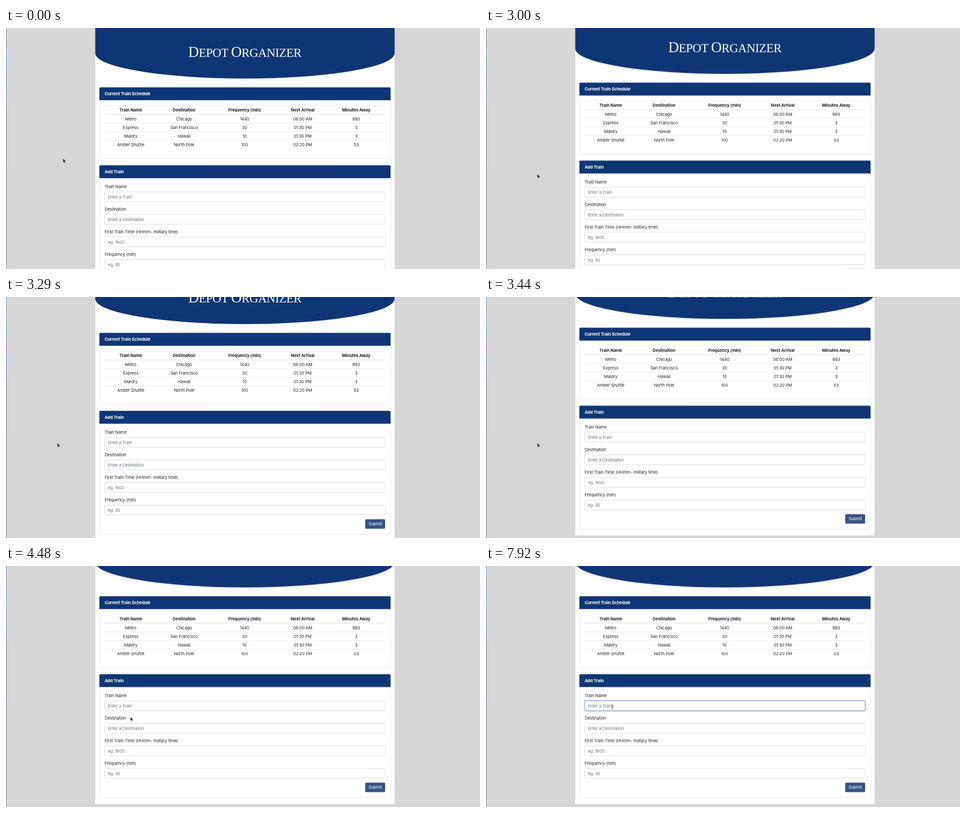
Recreate the animation shown at these times as an HTML page. Size 1049x534 px, loop 8 s.

```html
<!DOCTYPE html>
<html lang="en">
<head>
<meta charset="utf-8">
<title>Depot Organizer</title>
<style>
html, body { margin: 0; width: 100%; height: 100%; overflow: hidden; background: #d6d6d6; }
svg { display: block; width: 1049px; height: 534px; }
text { font: 9.3px Inter, "Open Sans", sans-serif; letter-spacing: -.016em; fill: #212529; }
.mid { text-anchor: middle; }
.bold { font-weight: 700; }
.light { fill: #fff; }
.hint { fill: #6c757d; }
.title { font: 27px "Liberation Serif", serif; letter-spacing: -.5px; fill: #fff; }
.title tspan { font-size: 33px; }
.navy { fill: #0f3674; }
.card { fill: #fff; stroke: #dfdfdf; stroke-width: .8; }
.field { fill: #fff; stroke: #ced4da; stroke-width: .9; }
.rule { stroke: #dee2e6; stroke-width: .8; }

#page, #cursor, #arrow, #beam, #focus, #caret { animation: 8s step-end infinite; }
#page { animation-name: scroll; }
#cursor { animation-name: move; }
#arrow { animation-name: arrow; }
#beam { animation-name: beam; }
#focus { animation-name: focus; }
#caret { animation-name: blink; }

@keyframes scroll {
  0% { transform: translateY(0); }
  37.5% { transform: translateY(-10.4px); }
  39.375% { transform: translateY(-28.5px); }
  41.125% { transform: translateY(-52px); }
  43% { transform: translateY(-63.4px); }
  44.875%, 100% { transform: translateY(-64.5px); }
}
@keyframes move {
  0% { transform: translate(126.4px, 289.5px); }
  1.875% { transform: translate(127.5px, 296px); }
  3.75% { transform: translate(127px, 312px); }
  5.625% { transform: translate(123px, 327px); }
  7.5% { transform: translate(117px, 331.5px); }
  9.375% { transform: translate(113.2px, 324.2px); }
  13.125% { transform: translate(113.6px, 323.6px); }
  50.5% { transform: translate(124px, 329px); }
  52.25% { transform: translate(175px, 347px); }
  54.125% { transform: translate(243px, 348px); }
  56% { transform: translate(275.4px, 334.4px); }
  57.75% { transform: translate(279px, 322px); }
  59.625% { transform: translate(280px, 315px); }
  61.5% { transform: translate(280px, 313px); }
  63.375%, 100% { transform: translate(279.8px, 312.2px); }
}
@keyframes arrow { 0% { opacity: 1; } 59.625%, 100% { opacity: 0; } }
@keyframes beam { 0% { opacity: 0; } 59.625%, 100% { opacity: 1; } }
@keyframes focus { 0% { opacity: 0; } 67.125% { opacity: .6; } 69%, 100% { opacity: 1; } }
@keyframes blink {
  0% { opacity: 0; }
  67.125% { opacity: 1; }
  72.75% { opacity: 0; }
  80.25% { opacity: 1; }
  85.875% { opacity: 0; }
  91.5% { opacity: 1; }
  99%, 100% { opacity: 0; }
}
</style>
</head>
<body>
<svg viewBox="0 0 1049 534">
  <defs>
    <linearGradient id="edge" x2="0" y2="1">
      <stop offset="0" stop-color="#3fa9d0"/>
      <stop offset=".05" stop-color="#8a7d9c"/>
      <stop offset=".14" stop-color="#43a5cd"/>
      <stop offset=".2" stop-color="#8d6a90"/>
      <stop offset=".26" stop-color="#45a0cc"/>
      <stop offset=".31" stop-color="#806c95"/>
      <stop offset=".38" stop-color="#42597f"/>
      <stop offset=".54" stop-color="#53628f"/>
      <stop offset=".6" stop-color="#80708f"/>
      <stop offset="1" stop-color="#85708d"/>
    </linearGradient>
  </defs>
  <rect width="1" height="534" fill="url(#edge)"/>
  <g id="page">
    <rect x="197.5" width="662.5" height="591.6" fill="#fefefe"/>
    <path class="navy" d="M197.5 0H860V56A331.25 56 0 0 1 197.5 56Z"/>
    <text class="title mid" x="528.5" y="63.6"><tspan>D</tspan>EPOT <tspan>O</tspan>RGANIZER</text>
    <g id="cards"></g>
    <g id="table"></g>
    <g id="form"></g>
    <g id="focus">
      <rect x="217.5" y="362.1" width="622.5" height="23.8" rx="3" fill="none" stroke="#007bff" stroke-opacity=".25" stroke-width="2"/>
      <rect x="218.5" y="363.1" width="620.5" height="21.8" rx="2.3" fill="none" stroke="#7fa3cf" stroke-width="1"/>
    </g>
    <rect id="caret" x="226" y="368.5" width=".8" height="11" fill="#333"/>
    <rect x="795" y="544.5" width="44" height="21" rx="2.3" fill="#345383"/>
    <text class="mid light" x="817" y="558.3">Submit</text>
  </g>
  <g id="cursor">
    <path id="arrow" d="M0 0V8.7L2 6.9L3.3 9.8L4.7 9.2L3.5 6.4H6.2Z" fill="#000" stroke="#fff" stroke-width=".5"/>
    <path id="beam" d="M-2 -4Q0 -4 0 -3Q0 -4 2 -4M0 -3V3M-2 4Q0 4 0 3Q0 4 2 4M-1 1H1" fill="none" stroke="#222" stroke-width=".9"/>
  </g>
</svg>
<script>
const put = (id, markup) => { document.getElementById(id).innerHTML += markup; };
const text = (x, mid, str, cls = "") => `<text class="${cls}" x="${x}" y="${mid + 3.4}">${str}</text>`;
const rule = (y, w = 0.8) => `<path class="rule" style="stroke-width:${w}" d="M218 ${y}H839.5"/>`;

const card = (y, bottom, name) =>
  `<rect class="card" x="207" y="${y}" width="644" height="${bottom - y}" rx="2.3"/>` +
  `<path class="navy" d="M206.7 ${y + 28.6}v-26.3q0-2.3 2.3-2.3h639.8q2.3 0 2.3 2.3v26.3z"/>` +
  text(218.2, y + 14.3, name, "bold light");
put("cards", card(131.5, 289.6, "Current Train Schedule") + card(304.2, 578, "Add Train"));

const columns = [276, 394, 528, 656.5, 775];
const rows = [
  ["Train Name", "Destination", "Frequency (min)", "Next Arrival", "Minutes Away"],
  ["Metro", "Chicago", "1440", "06:00 AM", "993"],
  ["Express", "San Francisco", "30", "01:30 PM", "3"],
  ["Maldry", "Hawaii", "10", "01:30 PM", "3"],
  ["Amber Shuttle", "North Pole", "100", "02:20 PM", "53"]
];
rows.forEach((row, i) => {
  const y = 182 + i * 19.25;
  put("table", rule(i ? y - 9.9 : 171.7, i === 1 ? 1.3 : 0.8) +
    row.map((str, c) => text(columns[c], y, str, i ? "mid" : "mid bold")).join(""));
});

const fields = [
  ["Train Name", "Enter a Train"],
  ["Destination", "Enter a Destination"],
  ["First Train Time (HHmm- military time)", "eg. 1600"],
  ["Frequency (min)", "eg. 45"]
];
fields.forEach(([label, hint], i) => {
  const y = 351.5 + i * 50;
  put("form", text(218.2, y, label) +
    `<rect class="field" x="218.5" y="${y + 11.6}" width="620.5" height="21.8" rx="2.3"/>` +
    text(225.4, y + 22.6, hint, "hint"));
});
</script>
</body>
</html>
```
